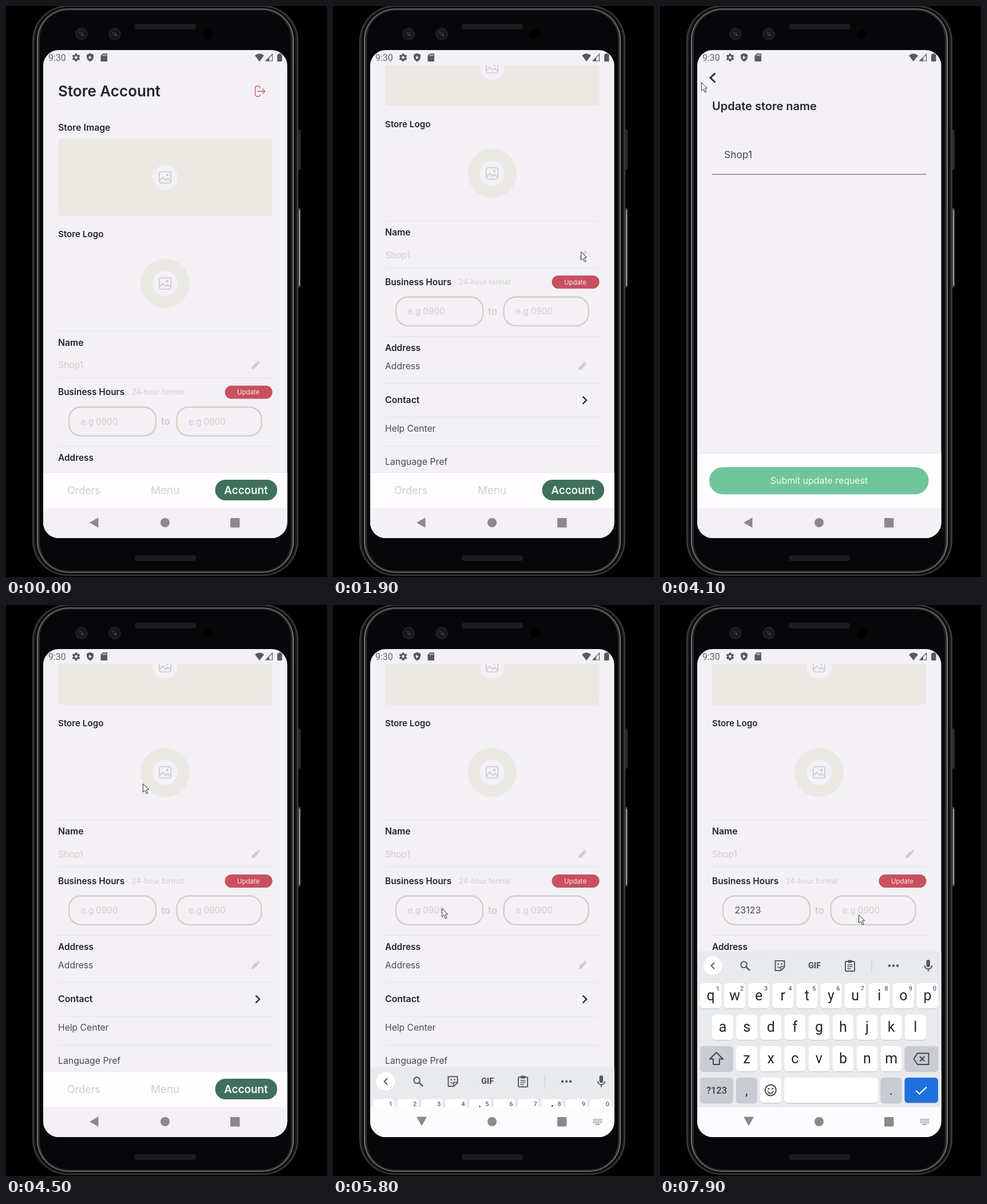
These frames come from a looping animation (561 by 998 pixels, 8 s). An HTML page with a canvas:

```html
<!DOCTYPE html>
<html lang="en">
<head>
<meta charset="utf-8">
<title>Store account</title>
<style>
html, body { margin: 0; width: 100%; height: 100%; overflow: hidden; background: #000; }
canvas { display: block; width: 561px; height: 998px; }
</style>
</head>
<body>
<canvas id="stage" width="561" height="998"></canvas>
<script>
const g = document.getElementById('stage').getContext('2d');
const LOOP = 8000, STEP = 100, TAU = Math.PI * 2;
const UI = 'Inter, sans-serif', SYS = 'Roboto, sans-serif';
const PAGE = '#f3f1f5', INK = '#252428', SOFT = '#4b494e', PALE = '#d2cfca',
      SAND = '#ebe9e4', RED = '#c9505f', GREY = '#8b898c', ICON = '#58595d';

// Cursor stops: time, x, y
const PATH = [
  [100, 296, 640], [300, 293, 610], [800, 293, 418], [1200, 293, 418],
  [1700, 433, 429], [2000, 433, 429], [2500, 234, 475], [2900, 245, 838],
  [3100, 245, 838], [3600, 72, 140], [4100, 72, 133], [4200, 88, 124],
  [4300, 88, 124], [4700, 390, 500], [5200, 401, 525], [5600, 190, 530],
  [6000, 190, 530], [6400, 266, 515], [7400, 266, 515], [7800, 347, 541]
];
// Typed value of the first field
const TYPED = [
  [6100, 'a'], [6200, 'as'], [6300, 'asd'], [6400, 'asda'],
  [6700, 'asd'], [6800, 'as'], [6900, 'a'], [7000, ''],
  [7300, '2'], [7500, '23'], [7600, '231'], [7700, '2312'], [7800, '23123']
];

const ease = p => p * p * (3 - 2 * p);
const span = (t, a, b) => ease(Math.min(1, Math.max(0, (t - a) / (b - a))));

function box(x, y, w, h, r, fill) {
  g.beginPath();
  g.roundRect(x, y, w, h, r);
  if (fill) { g.fillStyle = fill; g.fill(); }
}
function disc(x, y, r, fill) {
  g.beginPath();
  g.arc(x, y, r, 0, TAU);
  g.fillStyle = fill;
  g.fill();
}
function trace(points, close) {
  g.beginPath();
  points.forEach(([x, y], i) => i ? g.lineTo(x, y) : g.moveTo(x, y));
  if (close) g.closePath();
}
function poly(points, fill) { trace(points, true); g.fillStyle = fill; g.fill(); }
function pen(color, width) { g.strokeStyle = color; g.lineWidth = width; g.stroke(); }
function line(points, color, width) { trace(points); pen(color, width); }
function ring(x, y, r, color, width) { g.beginPath(); g.arc(x, y, r, 0, TAU); pen(color, width); }
function text(s, x, y, size, color, weight = 400, align = 'left', face = UI) {
  g.font = `${weight} ${size}px ${face}`;
  g.textAlign = align;
  g.fillStyle = color;
  g.fillText(s, x, y);
}
function at(x, y, draw) { g.save(); g.translate(x, y); draw(); g.restore(); }
const rule = y => box(91, y, 374, 1.3, 0, '#e7e5e5');

function phone() {
  g.fillStyle = '#000';
  g.fillRect(0, 0, 561, 998);
  box(509, 216, 6, 70, 2, '#29292b');
  box(509, 353, 6, 139, 2, '#3a3a3c');
  box(512, 356, 2, 133, 1, '#98989a');
  const shells = [[0, 62, '#3c3c3e'], [2.5, 60, '#19191b'], [5, 58, '#0b0b0d'],
                  [8, 55, '#737376'], [10, 53, '#2a2a2d'], [13, 50, '#070709']];
  for (const [d, r, c] of shells) box(46 + d, d * .7 - 1, 465 - 2 * d, 997 - d * 1.4, r, c);
  for (const y of [31, 960]) {
    box(225, y, 107, 10, 4, '#1b1b1d');
    g.setLineDash([1.5, 2]);
    line([[228, y + 3.5], [329, y + 3.5]], '#252528', 1);
    line([[229, y + 6.5], [329, y + 6.5]], '#252528', 1);
    g.setLineDash([]);
  }
  for (const x of [132, 190]) {
    disc(x, 49, 11, '#1b1d1f');
    disc(x, 49, 7, '#111719');
    disc(x, 49, 4, '#1d2829');
    disc(x + 2, 51, 1.3, '#526061');
    disc(x - 3, 46, 1, '#3d4749');
  }
  disc(353, 49, 8.5, '#000');
}

function statusBar() {
  text('9:30', 74, 96, 16, '#656468', 400, 'left', SYS);
  at(122.5, 90, () => {
    for (let i = 0; i < 6; i++) {
      g.rotate(TAU / 6);
      box(-1.8, -7, 3.6, 4, .6, ICON);
    }
    ring(0, 0, 3.8, ICON, 2.8);
  });
  poly([[147, 82.5], [153, 85], [153, 90], [151, 94.5], [147, 97.5], [143, 94.5], [141, 90], [141, 85]], ICON);
  poly([[145, 87], [150, 90], [145, 93]], PAGE);
  poly([[169, 83], [177, 83], [177, 97], [165.5, 97], [165.5, 87]], ICON);
  for (const x of [169, 171.5, 174]) box(x, 84.5, 1.2, 3, 0, PAGE);
  g.beginPath();
  g.moveTo(443, 97);
  g.lineTo(435, 86.5);
  g.quadraticCurveTo(443, 80, 451, 86.5);
  g.fillStyle = ICON;
  g.fill();
  trace([[465.5, 84], [465.5, 96], [454, 96]], true);
  pen(ICON, 1.2);
  poly([[460, 90], [460, 96], [454, 96]], ICON);
  box(474, 84.5, 8.5, 12.5, 1, ICON);
  box(476.3, 83, 4, 3, 0, ICON);
}

function picture(x, y) {
  disc(x, y, 22, PAGE);
  g.lineJoin = 'round';
  box(x - 10.3, y - 10, 20.6, 20, 4);
  pen('#cbc9c8', 1.7);
  line([[x - 10, y + 6], [x - 4, y], [x + 1, y + 5], [x + 5, y + 2], [x + 10, y + 7]], '#cbc9c8', 1.7);
  disc(x + 4, y - 4, 1.9, '#cbc9c8');
  g.lineJoin = 'miter';
}

function pencil(x, y) {
  at(x, y, () => {
    g.rotate(Math.PI / 4);
    poly([[-2.6, -5.5], [2.6, -5.5], [2.6, 5.5], [0, 9.5], [-2.6, 5.5]], '#cecbc7');
    box(-2.6, -9, 5.2, 2.6, 1, '#cecbc7');
  });
}

function field(x, w, value) {
  box(x, 701, w, 50.3, 21);
  pen('#d1cec8', 2.3);
  const tx = x + 20.5;
  if (!value) return text('e.g 0900', tx, 731.5, 15.2, PALE);
  const word = /[a-z]/.test(value);
  text(value, tx, 731.5, word ? 18.5 : 16, SOFT);
  if (word) box(tx, 734.5, g.measureText(value).width, 1.2, 0, SOFT);
}

function account(scroll, value) {
  g.save();
  g.beginPath();
  g.rect(65, 103, 427, 713);
  g.clip();
  g.translate(0, -scroll);

  text('Store Account', 91, 158, 26, INK, 600);
  g.lineJoin = g.lineCap = 'round';
  line([[444, 143], [444, 141], [442, 140], [437.5, 140], [435.5, 142], [435.5, 156], [437.5, 158], [442, 158], [444, 157], [444, 155]], RED, 1.3);
  line([[440, 149], [452.5, 149]], RED, 1.3);
  line([[448.5, 145], [452.5, 149], [448.5, 153]], RED, 1.3);
  g.lineJoin = 'miter';
  g.lineCap = 'butt';

  text('Store Image', 91, 218, 15.8, INK, 600);
  box(91, 232, 374.5, 135, 5, SAND);
  picture(278, 299.5);
  text('Store Logo', 91, 404, 15.2, INK, 600);
  disc(278, 485, 43, SAND);
  picture(278, 485);

  rule(568);
  text('Name', 91, 593.5, 15.8, INK, 600);
  text('Shop1', 91, 633, 15.6, PALE);
  pencil(436, 628);
  rule(649);
  text('Business Hours', 91, 680, 15.4, INK, 600);
  text('24-hour format', 220, 679, 12.6, PALE);
  box(382.5, 663.5, 83, 23, 11.5, RED);
  text('Update', 423.5, 679, 11.4, '#f8e9ec', 400, 'center');
  field(110, 152, value);
  text('to', 271, 732, 17, PALE, 600);
  field(298.5, 148, '');

  rule(769);
  text('Address', 91, 795, 15.4, INK, 600);
  text('Address', 91, 827.5, 15.7, SOFT);
  pencil(436, 822);
  rule(851.5);
  text('Contact', 91, 886.5, 15.8, INK, 600);
  line([[436.5, 875], [443, 881.5], [436.5, 888]], INK, 2.4);
  rule(910.5);
  text('Help Center', 91, 936, 15.7, SOFT);
  rule(961.5);
  text('Language Pref', 91, 994, 15.8, SOFT);
  g.restore();

  box(65, 815, 427, 1, 0, '#eae8ec');
  box(65, 816, 427, 61.5, 0, '#fffdff');
  text('Orders', 136, 852.5, 18, PALE, 400, 'center');
  text('Menu', 278, 852.5, 18.8, PALE, 400, 'center');
  box(365.5, 828, 108.5, 36, 18, '#3f705a');
  text('Account', 419.5, 852.5, 18.8, '#f7fbf8', 600, 'center');
}

function rename() {
  line([[96.5, 117.5], [88, 125.5], [96.5, 133.5]], INK, 2.8);
  text('Update store name', 91, 182, 20, INK, 600);
  text('Shop1', 112, 266, 17.4, SOFT);
  box(91, 293.5, 374.5, 1.5, 0, '#858388');
  box(65, 781, 427, 1, 0, '#e8e6ea');
  box(65, 782, 427, 95.5, 0, '#fffdff');
  box(86, 806, 383.5, 47.5, 23.7, '#70c59c');
  text('Submit update request', 278, 835, 15.9, '#f1faf4', 400, 'center');
}

function navBar(open) {
  box(65, 877.5, 427, 53, 0, open ? '#fcfbfd' : PAGE);
  if (open) {
    poly([[146, 894.5], [164, 894.5], [155, 910.5]], GREY);
    for (let r = 0; r < 3; r++)
      for (let c = 0; c < 6; c++) box(454.5 + c * 2.8, 898 + r * 3, 1.8, 1.8, 0, GREY);
    box(458, 907, 8, 1.6, 0, GREY);
  } else {
    poly([[161.5, 894], [161.5, 912], [146, 903]], GREY);
  }
  disc(278, 903, 8, GREY);
  box(392, 895, 16.5, 16.5, 1, GREY);
}

function key(x, y, w, label, fill = '#fff', size = 25) {
  box(x, y + 1.2, w, 44, 5.5, '#c6c8cc');
  box(x, y, w, 44, 5.5, fill);
  if (label) text(label, x + w / 2, y + 29.5, size, '#25262a', 400, 'center', SYS);
}

function tools() {
  ring(146.5, 628.5, 5.3, ICON, 2.1);
  line([[150.3, 632.3], [157, 639]], ICON, 2.5);
  trace([[201.5, 622], [217.5, 622], [217.5, 633], [211, 639], [201.5, 639]], true);
  pen(ICON, 2);
  line([[217, 632], [211, 632], [211, 639]], ICON, 1.6);
  disc(206.5, 627.5, 1.4, ICON);
  disc(212.5, 627.5, 1.4, ICON);
  g.beginPath();
  g.arc(209, 630.5, 3.5, .3, 2.8);
  pen(ICON, 1.5);
  text('GIF', 270, 635, 14.5, ICON, 900, 'center', SYS);
  box(324, 623, 16, 17, 1.5);
  pen(ICON, 2);
  box(328, 620.5, 8, 5, 1.5, ICON);
  for (const y of [628, 631.5, 635]) box(327.5, y, y > 634 ? 6 : 9, 1.5, 0, ICON);
  box(369.5, 618, 1.2, 25, 0, '#cfd1d4');
  for (const x of [401, 408, 415]) disc(x, 630.5, 2.2, ICON);
}

function hints(word) {
  [word, word.toUpperCase(), 'adds'].forEach((s, i) =>
    text(s, [160.5, 277, 393][i], 638, 19.5, '#5b5d61', 400, 'center', SYS));
  for (const x of [215, 338.5]) box(x, 618, 1.2, 25, 0, '#cfd1d4');
}

function keyboard(value) {
  const dark = '#c9ccd2';
  box(65, 605.5, 427, 274, 0, '#e8eaed');
  const word = /[a-z]/.test(value);
  disc(92, 631.2, 16.5, '#d6d8dc');
  disc(92, 630.5, 16.5, '#fff');
  const d = word ? 1 : -1;
  line([[92.5 - 2.6 * d, 625], [92.5 + 2.9 * d, 630.5], [92.5 - 2.6 * d, 636]], ICON, 2);
  word ? hints(value) : tools();
  box(465.5, 620, 6.5, 13, 3.2, ICON);
  g.beginPath();
  g.arc(468.8, 630, 6.3, 0, Math.PI);
  pen(ICON, 1.9);
  box(467.8, 636, 2, 4.5, 0, ICON);

  [['qwertyuiop', 70, 661], ['asdfghjkl', 91, 716], ['zxcvbnm', 133, 771]].forEach(([row, x0, y], r) =>
    [...row].forEach((c, i) => {
      const x = x0 + i * 42.1;
      key(x, y, 37, c);
      if (!r) text((i + 1) % 10, x + 31, y + 13, 11, '#616267', 500, 'center', SYS);
    }));

  key(70, 771, 58, '', dark);
  g.lineJoin = 'round';
  trace([[98.5, 782], [110, 793.5], [104, 793.5], [104, 803], [93, 803], [93, 793.5], [87, 793.5]], true);
  pen('#45464a', 2);
  key(427.5, 771, 58.5, '', dark);
  trace([[450, 783.5], [469.5, 783.5], [469.5, 803], [450, 803], [443.5, 793.2]], true);
  pen('#45464a', 2);
  line([[454, 789], [462.5, 797.5]], '#45464a', 2);
  line([[462.5, 789], [454, 797.5]], '#45464a', 2);
  g.lineJoin = 'miter';

  key(70, 826, 58, '', dark);
  text('?123', 99, 854, 16.5, '#3f4044', 500, 'center', SYS);
  key(133, 826, 37, ',', dark, 22);
  key(175, 826, 37, '');
  ring(193.3, 848, 9.5, '#45464a', 2);
  disc(190, 845.5, 1.5, '#45464a');
  disc(196.6, 845.5, 1.5, '#45464a');
  g.beginPath();
  g.arc(193.3, 848.5, 5, .25, Math.PI - .25);
  pen('#45464a', 1.8);
  key(217, 826, 164, '');
  key(385.5, 826, 37, '.', dark, 22);
  key(427.5, 826, 58.5, '', '#1f70df');
  line([[447.5, 849], [453.5, 854.5], [466, 842.5]], '#fff', 2.2);
}

function cursor(t) {
  if (t < PATH[0][0]) return;
  let i = 0;
  while (i < PATH.length - 1 && PATH[i + 1][0] <= t) i++;
  const a = PATH[i], b = PATH[i + 1] || a;
  const p = a === b ? 0 : span(t, a[0], b[0]);
  at(a[1] + (b[1] - a[1]) * p, a[2] + (b[2] - a[2]) * p, () => {
    trace([[.5, .5], [.5, 15], [3.9, 11.9], [6.6, 18], [9, 17], [6.3, 11], [10.5, 10.5]], true);
    g.fillStyle = '#fff';
    g.fill();
    pen('#2b2b2d', 1);
  });
}

function draw(t) {
  phone();
  g.save();
  box(65, 77, 426.5, 853, 27, PAGE);
  g.clip();
  statusBar();
  let value = '';
  for (const [when, s] of TYPED) if (t >= when) value = s;
  if (t >= 2100 && t < 4400) rename();
  else account(192.5 * span(t, 300, 800), value);
  const rise = span(t, 5700, 6000);
  if (rise > 0) at(0, 273 * (1 - rise), () => keyboard(value));
  navBar(rise > 0);
  g.restore();
  cursor(t);
}

function tick() {
  draw(Math.floor(performance.now() % LOOP / STEP) * STEP);
  requestAnimationFrame(tick);
}
tick();
</script>
</body>
</html>
```
